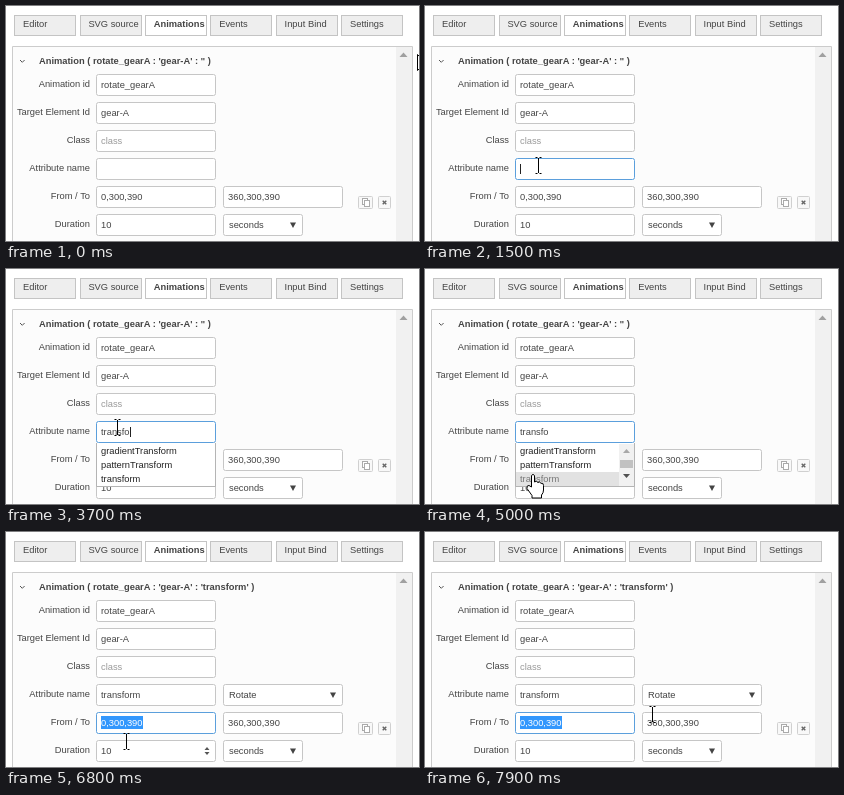
An HTML page that plays this animation: 413 px wide and 235 px high, repeating every 8 s.

```html
<!DOCTYPE html>
<html lang="en">
<head>
<meta charset="utf-8">
<title>Animation settings</title>
<style>
html, body { margin: 0; width: 100%; height: 100%; overflow: hidden; background: #fff; }
svg { display: block; width: 100%; height: 100%; }
text { font: 9.33px "Liberation Sans", Arial, sans-serif; fill: #444; white-space: pre; }
.bold { font-weight: bold; }
.end { text-anchor: end; }
.hint { fill: #999; }
</style>
</head>
<body>
<svg id="stage" viewBox="0 0 413 235"></svg>
<script>
const stage = document.getElementById('stage');
const LOOP = 8000, STEP = 100;
const EDGE = '#c6c6c6', FOCUS = '#5b9fdc';

function add(tag, attrs, parent = stage) {
  const el = document.createElementNS('http://www.w3.org/2000/svg', tag);
  for (const k in attrs) el.setAttribute(k, attrs[k]);
  parent.appendChild(el);
  return el;
}
const group = (parent = stage) => add('g', {}, parent);
const path = (d, attrs, parent) => add('path', { d, ...attrs }, parent);
function box(x, y, w, h, fill, stroke, parent, rx = 0) {
  return add('rect', { x: x + .5, y: y + .5, width: w - 1, height: h - 1, rx, fill, stroke }, parent);
}
function label(str, x, y, cls = '', parent = stage) {
  const el = add('text', { x, y, class: cls }, parent);
  el.textContent = str;
  return el;
}
const show = (el, on) => el.setAttribute('visibility', on ? 'visible' : 'hidden');
const within = (t, spans) => spans.some(([a, b]) => t >= a && t < b);

// Form parts
function field(x, row, w = 120, value = '', cls = '', parent = stage) {
  const y = 68 + row * 28;
  const frame = box(x, y, w, 22, '#fff', EDGE, parent, 2);
  const text = label(value, x + 5, y + 14, cls, parent);
  return { frame, text };
}
function select(x, row, w, value, parent) {
  const f = field(x, row, w, value, '', parent);
  f.text.setAttribute('x', x + 6);
  path(`M${x + w - 13} ${76.5 + row * 28}h6l-3 5.5z`, { fill: '#444' }, parent);
}

add('rect', { width: 413, height: 235, fill: '#fff' });
['Editor', 'SVG source', 'Animations', 'Events', 'Input Bind', 'Settings'].forEach((name, i) => {
  const x = 8.6 + i * 65.4, active = i === 2;
  box(Math.floor(x), 9, 62, 21, active ? '#fff' : '#eee', '#c4c4c4');
  label(name, x + 8.4, 21, active ? 'bold' : '');
});

path('M6.5 235V40.5H406.5V235', { fill: '#fcfcfc', stroke: '#ccc' });
add('rect', { x: 390, y: 41, width: 16, height: 194, fill: '#f1f1f1' });
path('M393.5 51h8l-4-4.5z', { fill: '#a0a0a0' });
path('M14 54l2.3 2.3L18.6 54', { fill: 'none', stroke: '#555' });
const title = label('', 33, 58, 'bold');

['Animation id', 'Target Element Id', 'Class', 'Attribute name', 'From / To', 'Duration']
  .forEach((name, i) => label(name, 84, 81 + i * 28, 'end'));

field(90, 0, 120, 'rotate_gearA');
field(90, 1, 120, 'gear-A');
field(90, 2, 120, 'class', 'hint');
const attr = field(90, 3);
const from = field(90, 4, 120, '0,300,390');
field(217, 4, 120, '360,300,390');
field(90, 5, 120, '10');
select(217, 5, 80, 'seconds');

const kind = group();
select(217, 3, 120, 'Rotate', kind);

const picked = group();
add('rect', { x: 95, y: 184, width: 42, height: 13, fill: '#3297fd' }, picked);
label('0,300,390', 95, 194, '', picked).style.fill = '#fff';

const spinner = group();
path('M198.5 218h5l-2.5-3zM198.5 220h5l-2.5 3z', { fill: '#555' }, spinner);
const caret = add('rect', { y: 158, width: 1, height: 10, fill: '#222' });

// Row buttons
box(352, 190, 15, 13, '#f8f8f8', '#d0d0d0', stage, 1);
box(356, 192, 6, 7, '#fff', '#aaa');
box(358, 194, 6, 7, '#fff', '#aaa');
box(372, 190, 13, 13, '#f8f8f8', '#d0d0d0', stage, 1);
path('M376.7 194.7l3.6 3.6m0-3.6l-3.6 3.6', { stroke: '#666', 'stroke-width': 1.4 });

// Suggestion list
const list = group();
add('rect', { x: 90, y: 174, width: 120, height: 43, fill: '#fff' }, list);
path('M90.5 174V217.5H209.5V174', { fill: 'none', stroke: '#b4b4b4' }, list);
const hover = add('rect', { x: 91, width: 118, height: 14, fill: '#e2e2e2' }, list);
const options = ['gradientTransform', 'patternTransform', 'transform'].map((s, i) =>
  label(s, 95, 185 + i * 14, '', list));
const bar = group(list);
add('rect', { x: 194, y: 175, width: 15, height: 42, fill: '#f1f1f1' }, bar);
add('rect', { x: 195, y: 191, width: 13, height: 8, fill: '#c1c1c1' }, bar);
path('M198 184h7l-3.5-4z', { fill: '#a8a8a8' }, bar);
path('M198 205h7l-3.5 4z', { fill: '#505050' }, bar);

// Pointers, each with its hot spot at the origin
const pointer = group();
const ink = { fill: '#fff', stroke: '#000', 'stroke-linejoin': 'round' };
const shapes = {
  arrow: path('M.5 .5V16.5L4.2 13 6.8 18.6 9.2 17.5 6.7 12H11.7Z', ink, pointer),
  beam: path('M-2.5-7.5H-.5M1.5-7.5H3.5M.5-7V8M-2.5 8.5H-.5M1.5 8.5H3.5',
    { fill: 'none', stroke: '#000' }, pointer),
  hand: path('M-1.5 13V1.5Q0-.8 1.5 1.5V8Q3.5 6.3 4.8 8.5 6.8 7.2 8 9.3 10.5 8.5 10.5 11.5V16Q10.5 19 8.5 21V24H-1V21.5L-6 14.5Q-6.5 11-4 11.5Z',
    ink, pointer)
};
const route = [
  [0, 411, 48, 'arrow'], [300, 176, 152, 'beam'], [400, 84, 152, 'arrow'],
  [600, 9, 152, 'arrow'], [700, 20, 167, 'arrow'], [900, 44, 154, 'arrow'],
  [1200, 82, 158, 'arrow'], [1300, 100, 160, 'beam'], [1500, 113, 159, 'beam'],
  [1700, 113, 159, 'beam'], [1900, 111, 158, 'beam'], [4700, 111, 158, 'beam'],
  [4900, 109, 190, 'hand'], [5000, 108, 205, 'hand'], [5300, 114, 207, 'hand'],
  [5600, 114, 207, 'hand'], [5700, 120, 209, 'beam'], [7000, 120, 209, 'beam'],
  [7300, 185, 206, 'beam'], [7400, 215, 190, 'arrow'], [7600, 264, 146, 'arrow'],
  [7800, 238, 172, 'arrow'], [7900, 227, 182, 'beam'], [8000, 227, 182, 'beam']
];
function movePointer(t) {
  const i = route.findIndex((p, n) => n === route.length - 2 || t < route[n + 1][0]);
  const [t0, x0, y0, shape] = route[i], [t1, x1, y1] = route[i + 1];
  const k = (t - t0) / (t1 - t0);
  const x = Math.round(x0 + (x1 - x0) * k), y = Math.round(y0 + (y1 - y0) * k);
  pointer.setAttribute('transform', `translate(${x} ${y})`);
  for (const s in shapes) show(shapes[s], s === shape);
}

const keyTimes = [2300, 2500, 2600, 2800, 3000, 3100, 3400];
const caretSpans = [[1500, 2000], [2300, 3800], [4300, 4800], [5300, 6100], [6600, 6800]];
const CHOSEN = 5600, COMMIT = 6800;

function render(ms) {
  const t = Math.floor(ms / STEP) * STEP;
  const done = t >= COMMIT;
  const typed = t >= CHOSEN ? 9 : keyTimes.filter(k => t >= k).length;
  attr.text.textContent = 'transform'.slice(0, typed);
  title.textContent = `Animation ( rotate_gearA : 'gear-A' : '${done ? 'transform' : ''}' )`;
  attr.frame.setAttribute('stroke', t >= 1500 && !done ? FOCUS : EDGE);
  from.frame.setAttribute('stroke', done ? FOCUS : EDGE);
  show(kind, done);
  show(picked, done);
  show(spinner, within(t, [[5700, 7400]]));

  const width = typed ? attr.text.getComputedTextLength() : 0;
  caret.setAttribute('x', Math.round(95 + width));
  show(caret, within(t, caretSpans));

  list.setAttribute('display', within(t, [[3700, CHOSEN]]) ? 'inline' : 'none');
  const hovered = t < 4900 ? -1 : t < 5000 ? 1 : 2;
  show(bar, hovered >= 0);
  show(hover, hovered >= 0);
  hover.setAttribute('y', 175 + hovered * 14);
  options.forEach((el, i) => { el.style.fill = i === hovered ? '#777' : '#222'; });
  movePointer(t);
}

const start = performance.now();
function tick() {
  render((performance.now() - start) % LOOP);
  requestAnimationFrame(tick);
}
tick();
</script>
</body>
</html>
```
